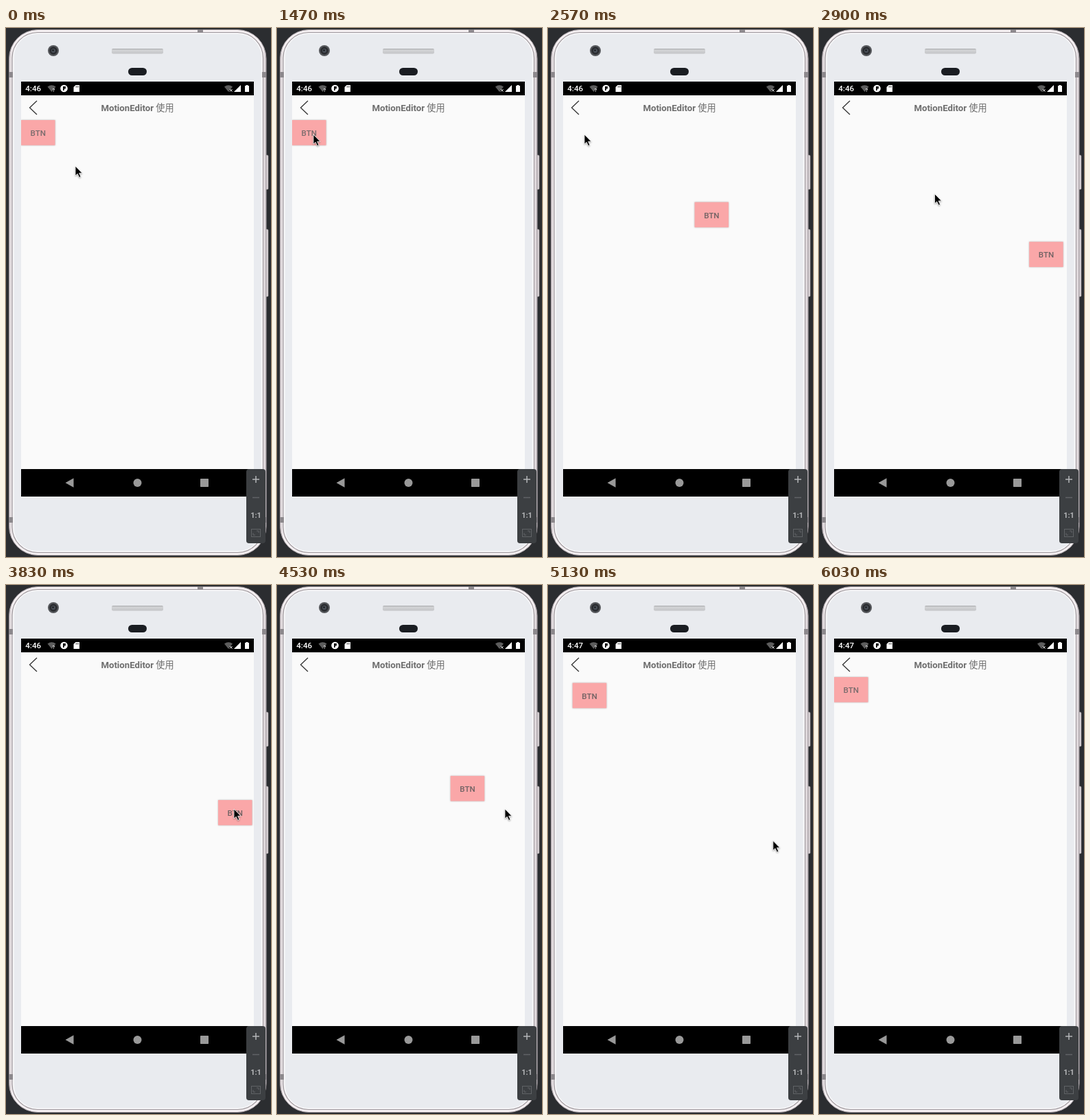
Recreate the animation shown at these times as an HTML page. Size 386 px wide and 770 px high, loop 6.63 s.

```html
<!DOCTYPE html>
<html lang="zh">
<head>
<meta charset="utf-8">
<title>MotionEditor 使用</title>
<style>
  html, body { margin: 0; width: 100%; height: 100%; overflow: hidden; background: #2b2d30; }
  svg { display: block; width: 386px; height: 770px; }
  text { font-family: Roboto, "Noto Sans CJK SC", "Noto Sans CJK", sans-serif; }
  .btn { filter: drop-shadow(0 .8px .8px rgba(0, 0, 0, .28)); }
  #cursor { filter: drop-shadow(0 1px 1px rgba(0, 0, 0, .35)); }
</style>
</head>
<body>
<svg viewBox="0 0 386 770">
  <defs>
    <linearGradient id="rim" x1="0" x2="1" y1="0" y2="0">
      <stop offset="0" stop-color="#cfc7cb"/>
      <stop offset=".012" stop-color="#f4eff1"/>
      <stop offset=".988" stop-color="#f4eff1"/>
      <stop offset="1" stop-color="#c9c1c6"/>
    </linearGradient>
    <linearGradient id="grille" x1="0" x2="0" y1="0" y2="1">
      <stop offset="0" stop-color="#a9abad"/>
      <stop offset=".3" stop-color="#d3d4d6"/>
      <stop offset="1" stop-color="#c3c4c7"/>
    </linearGradient>
    <clipPath id="screen"><rect x="22" y="78" width="339" height="604"/></clipPath>
  </defs>

  <!-- phone body -->
  <rect width="386" height="770" fill="#2b2d30"/>
  <g fill="#dcd6d9" stroke="#8d888c" stroke-width=".6">
    <rect x="377" y="185" width="5" height="50" rx="1.5"/>
    <rect x="377" y="293" width="5" height="98" rx="1.5"/>
  </g>
  <rect x="4.5" y="2.5" width="374.5" height="765" rx="42" fill="url(#rim)" stroke="#a39ca1"/>
  <rect x="9" y="6.5" width="365.5" height="757" rx="37" fill="#f5f5f7" stroke="#9d969b" stroke-width="1.2"/>
  <rect x="12" y="9" width="359.5" height="752" rx="33" fill="#e9ebef"/>
  <g fill="#8d898d">
    <rect x="4" y="64" width="6" height="8"/>
    <rect x="373" y="64" width="6" height="8"/>
    <rect x="4" y="712" width="6" height="8"/>
    <rect x="373" y="712" width="6" height="8"/>
    <rect x="279" y="2" width="8" height="4.5"/>
  </g>
  <circle cx="69" cy="33" r="8" fill="#55575b"/>
  <circle cx="69" cy="33" r="5.8" fill="#2a2c30"/>
  <circle cx="69" cy="33" r="3" fill="#4a5058"/>
  <circle cx="68.5" cy="32.5" r="1.3" fill="#17191c"/>
  <rect x="154" y="30" width="75" height="7.5" rx="2" fill="url(#grille)"/>
  <rect x="178" y="58" width="27" height="11" rx="5.5" fill="#1a1d22"/>

  <!-- screen -->
  <rect x="22" y="78" width="339" height="604" fill="#fafafa"/>
  <rect x="22" y="78" width="339" height="20"/>
  <text id="clock" x="28.3" y="92.2" font-size="11.55" font-weight="500" fill="#fff">4:46</text>
  <g fill="#5d5d5d">
    <path d="M60.5 85.5Q66.500 81 72.500 85.500L66.500 93Z"/>
    <path d="M318 85.500Q324 81 330 85.500L324 93Z"/>
  </g>
  <text x="67.500" y="93" font-size="7.500" font-weight="700" fill="#ddd">?</text>
  <path d="M326 89l3.500 3.500m0-3.500l-3.500 3.500" stroke="#fff" stroke-width="1"/>
  <circle cx="84.500" cy="88" r="5.300" fill="#fff"/>
  <path d="M83 85h3.800v3.500H84.700V91H83Z"/>
  <path d="M101.500 83H107V93H98.500V86Z" fill="#fff"/>
  <path d="M102 84.500v2m1.700-2v2m1.700-2v2" stroke="#000" stroke-width=".7"/>
  <path d="M342 83V93H332Z" fill="#fff"/>
  <path d="M348 84h1.700v-1h2.600v1H354v9h-6Z" fill="#fff"/>

  <path d="M45 106L34.500 116L45 126" fill="none" stroke="#333" stroke-width="1.300"/>
  <text x="191.500" y="121" font-size="13.200" text-anchor="middle" fill="#6d6d6d"><tspan font-weight="700">MotionEditor</tspan><tspan font-weight="500"> 使用</tspan></text>

  <g clip-path="url(#screen)">
    <g id="button">
      <rect class="btn" width="49.500" height="36.700" fill="#faa7a8"/>
      <text id="label" x="24.800" y="23.100" font-size="11.550" font-weight="500" text-anchor="middle" fill="#796b6c">BTN</text>
    </g>
  </g>

  <rect x="22" y="642" width="339" height="40"/>
  <g fill="#999">
    <path d="M86.500 662L98.500 655.300V668.700Z"/>
    <circle cx="191.500" cy="662" r="6"/>
    <rect x="283" y="656" width="12" height="12" rx=".7"/>
  </g>

  <!-- emulator controls -->
  <rect x="350" y="642" width="28" height="108" rx="4" fill="#3c3f42"/>
  <g fill="none" stroke-width="1.500">
    <path d="M359 657h10m-5-5v10" stroke="#b4b6b8"/>
    <path d="M359 683.500h10" stroke="#606366"/>
    <g stroke="#606366" stroke-width="1">
      <rect x="357.500" y="729.500" width="13" height="11"/>
      <path d="M360 735v3h3m2-6h3v3"/>
    </g>
  </g>
  <text x="364" y="713" font-size="11" font-weight="700" text-anchor="middle" fill="#b4b6b8">1:1</text>

  <path id="cursor" d="M0 0V14L3.200 11.200L5.700 16.500L8 15.500L5.600 10.300H10Z" fill="#000" stroke="#fff" stroke-width=".8"/>
</svg>
<script>
const LOOP = 6630;
const [button, label, clock, cursor] =
  ["button", "label", "clock", "cursor"].map(id => document.getElementById(id));

// [ms, phase]: the phase is then eased to a position on the diagonal
const phases = [[1958, 0], [2965, 1], [4230, 1], [4570, .67], [4870, .404], [5270, 0]];

// [ms, x, y] of the pointer tip
const pointer = [
  [870, 101, 201], [1080, 82, 185], [1320, 51, 155], [1470, 53, 155],
  [2670, 53, 155], [2760, 83, 176], [2900, 168, 241], [3000, 222, 290], [3070, 237, 306],
  [3230, 237, 306], [3400, 273, 313], [3620, 322, 325], [3830, 332, 326],
  [5070, 332, 326], [5130, 328, 370], [5170, 320, 460], [5200, 308, 600]
];
const POINTER_END = 5230;

function sample(keys, t) {
  if (t <= keys[0][0]) return keys[0].slice(1);
  const i = keys.findIndex(k => k[0] > t);
  if (i < 0) return keys[keys.length - 1].slice(1);
  const [a, b] = [keys[i - 1], keys[i]];
  const u = (t - a[0]) / (b[0] - a[0]);
  return a.slice(1).map((v, n) => v + (b[n + 1] - v) * u);
}

const move = (el, x, y) => el.setAttribute("transform", `translate(${x.toFixed(2)} ${y.toFixed(2)})`);

function draw(t) {
  const p = (1 - Math.cos(Math.PI * sample(phases, t)[0])) / 2;
  move(button, 22 + 287 * p, 134 + 179 * p);
  label.setAttribute("fill", p > 0 ? "#6f6263" : "#796b6c");
  clock.textContent = t < 4620 ? "4:46" : "4:47";
  move(cursor, ...sample(pointer, t));
  cursor.style.visibility = t < POINTER_END ? "visible" : "hidden";
}

const start = performance.now();
function tick() {
  draw((performance.now() - start) % LOOP);
  requestAnimationFrame(tick);
}
tick();
</script>
</body>
</html>
```
